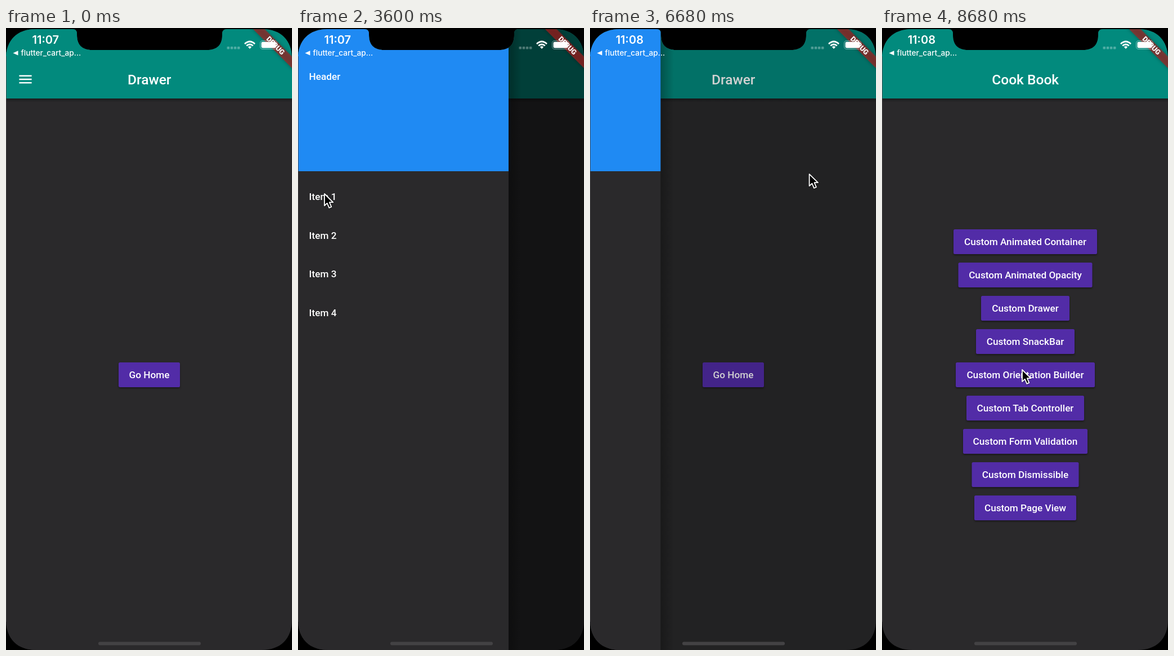
Animation, 508 px wide and 1103 px high, one loop 8.72 s. Source, as an HTML page:

```html
<!DOCTYPE html>
<html lang="en">
<head>
<meta charset="utf-8">
<title>Drawer</title>
<style>
  html, body { margin: 0; width: 100%; height: 100%; overflow: hidden; background: #000; }
  svg { display: block; width: 508px; height: 1103px; }
  text { fill: #fff; font-family: Roboto, "Noto Sans", sans-serif; font-weight: 500; font-size: 17.2px; }
  .mid { text-anchor: middle; }
  .title { font-size: 24.5px; text-anchor: middle; }
  .status { font-family: Inter, "Liberation Sans", sans-serif; }
  .body { fill: #2a292b; }
  .bar { fill: #028a7d; }
  .button { fill: #522ca7; filter: drop-shadow(0 2px 1.5px rgba(0, 0, 0, .4)); }
</style>
</head>
<body>
<svg viewBox="0 0 508 1103">
  <defs>
    <clipPath id="screen">
      <path d="M0 54C0 22 20 2 52 2H118Q126 2 126 10V12C126 30 135 39 153 39H357C375 39 384 30 384 12V10Q384 2 392 2H456C488 2 508 22 508 54V1049C508 1083 488 1103 454 1103H54C20 1103 0 1083 0 1049Z"/>
    </clipPath>
    <clipPath id="barClip"><rect width="508" height="125"/></clipPath>
    <linearGradient id="below" x2="0" y2="1">
      <stop stop-color="#000" stop-opacity=".32"/>
      <stop offset="1" stop-color="#000" stop-opacity="0"/>
    </linearGradient>
    <linearGradient id="beside">
      <stop stop-color="#000" stop-opacity=".28"/>
      <stop offset="1" stop-color="#000" stop-opacity="0"/>
    </linearGradient>
  </defs>

  <rect width="508" height="1103"/>
  <g clip-path="url(#screen)">
    <g id="home"></g>
    <g id="page"></g>
    <rect id="scrim" width="508" height="1103"/>
    <g id="drawer">
      <rect x="373.5" width="24" height="1103" fill="url(#beside)"/>
      <rect class="body" width="374" height="1103"/>
      <rect width="374" height="254" fill="#1f8af3"/>
      <text x="19.6" y="92.2">Header</text>
    </g>
    <g transform="translate(508 2) rotate(45)">
      <rect x="-60" y="34.3" width="120" height="14.7" fill="#b71c1c" fill-opacity=".63"
            style="filter:drop-shadow(0 0 3px rgba(0,0,0,.5))"/>
      <text class="mid" y="45.6" style="font-size:12.5px;font-weight:900">DEBUG</text>
    </g>
    <rect y="50" width="1" height="1003" fill="#48484a" fill-opacity=".8"/>
    <rect x="164" y="1088.5" width="182" height="6" rx="3" fill="#434244"/>
  </g>

  <text id="clock" class="status mid" x="70.3" y="28.2" style="font-size:20px;font-weight:600"></text>
  <path d="M12.5 44.4L21.5 40.2V48.6Z" fill="#fff"/>
  <text class="status" x="26.5" y="49" style="font-size:13.7px">flutter_cart_ap...</text>
  <g fill="#fff" fill-opacity=".3">
    <rect x="392.5" y="33" width="4.6" height="4.6" rx="1"/>
    <rect x="398.7" y="33" width="4.6" height="4.6" rx="1"/>
    <rect x="404.8" y="33" width="4.6" height="4.6" rx="1"/>
    <rect x="410.9" y="33" width="4.6" height="4.6" rx="1"/>
  </g>
  <g fill="none" stroke="#fff" stroke-width="2.7">
    <path d="M424 28.2Q433 19.8 442 28.2"/>
    <path d="M427.2 31.6Q433 26.4 438.800 31.6"/>
    <path d="M429.800 33.6Q433 31 436.2 33.600L433 37Z" fill="#fff" stroke="none"/>
  </g>
  <rect x="451.5" y="22.500" width="30" height="15" rx="4.2" fill="none" stroke="#fff" stroke-opacity=".45"/>
  <rect x="453.500" y="24.500" width="26" height="11" rx="2.4" fill="#fff"/>
  <path id="cursor" d="M0 0V21L4.800 16.600L8.300 24.800L12.300 23.100L8.900 15.100H15.300Z"
        stroke="#fff" stroke-width="1.800" stroke-linejoin="round"
        style="filter:drop-shadow(0 1px 1px rgba(0,0,0,.4))"/>
</svg>
<script>
const LOOP = 8720, STEP = 40, W = 508, DRAWER = 374;
const $ = id => document.getElementById(id);

const button = (label, width, y) =>
  `<rect class="button" x="${254.5 - width / 2}" y="${y}" width="${width}" height="44" rx="2.5"/>
   <text class="mid" x="254.5" y="${y + 28}">${label}</text>`;

const scaffold = (title, content) =>
  `<rect class="body" width="508" height="1103"/>
   <rect y="125" width="508" height="7" fill="url(#below)"/>
   <rect class="bar" width="508" height="125"/>
   <text class="title" x="254.7" y="99.6">${title}</text>${content}`;

const menu = [83.6, 89.8, 95.9].map(y =>
  `<rect x="23.4" y="${y}" width="22.2" height="2.45" fill="#fff"/>`).join('');

$('page').innerHTML = scaffold('Drawer',
  `<circle id="splash" cx="34.5" cy="91" fill="#fff" clip-path="url(#barClip)"/>${menu}` +
  button('Go Home', 109, 593));

const recipes = [
  ['Animated Container', 255], ['Animated Opacity', 238], ['Drawer', 157],
  ['SnackBar', 175], ['Orientation Builder', 247], ['Tab Controller', 209],
  ['Form Validation', 221], ['Dismissible', 190], ['Page View', 181]
];
$('home').innerHTML = scaffold('Cook Book',
  recipes.map(([name, w], i) => button('Custom ' + name, w, 357 + 59 * i)).join(''));

$('drawer').insertAdjacentHTML('beforeend', [1, 2, 3, 4].map(n =>
  `<text x="19.6" y="${235.9 + 68.8 * n}">Item ${n}</text>`).join(''));

// [time, x, y] of the pointer tip
const path = [
  [0, -30, 112], [160, -30, 112], [760, 226, 104], [1000, 228, 101], [1180, 272, 101],
  [1320, 240, 100], [1680, 39, 87], [2560, 39, 87], [2920, 46, 290], [3240, 50, 482],
  [3560, 47, 294], [3680, 47, 294], [3960, 49, 432], [4260, 46, 300], [4440, 46, 320],
  [4760, 49, 508], [5220, 42, 91], [5400, 42, 91], [5760, 210, 415], [6120, 396, 300],
  [6400, 403, 226], [6600, 403, 226], [7040, 249, 606], [LOOP, 249, 606]
];

const clamp = v => Math.max(0, Math.min(1, v));
const smooth = v => v * v * (3 - 2 * v);

function pointer(t) {
  const i = path.findIndex(p => p[0] > t);
  const [t0, x0, y0] = path[i - 1], [t1, x1, y1] = path[i];
  const k = smooth((t - t0) / (t1 - t0));
  return [x0 + (x1 - x0) * k, y0 + (y1 - y0) * k];
}

// Critically damped spring, 0 to 1
function spring(ms) {
  if (ms <= 0) return 0;
  const s = ms / 1000, w = Math.sqrt(500);
  return ms > 450 ? 1 : clamp(1 - Math.exp(-w * s) * (1 + (w - 1) * s));
}

function bezier(x, x1, y1, x2, y2) {
  if (x <= 0 || x >= 1) return clamp(x);
  const at = (u, a, b) => 3 * u * (1 - u) ** 2 * a + 3 * u * u * (1 - u) * b + u ** 3;
  let lo = 0, hi = 1;
  for (let i = 0; i < 24; i++) {
    const mid = (lo + hi) / 2;
    if (at(mid, x1, x2) < x) lo = mid; else hi = mid;
  }
  return at(lo, y1, y2);
}

const move = (id, x, y = 0) => $(id).setAttribute('transform', `translate(${x.toFixed(2)} ${y.toFixed(2)})`);

function draw(t) {
  const open = spring(t - 2008) - spring(t - 6580);
  move('drawer', DRAWER * (open - 1) - (open < .001 ? 30 : 0));
  $('scrim').setAttribute('fill-opacity', (.54 * open).toFixed(3));

  const pop = bezier((t - 7500) / 400, .35, .91, .33, .97);
  move('page', W * pop);
  move('home', -W / 3 * (1 - pop));

  const press = clamp((t - 1720) / 280);
  $('splash').setAttribute('r', press ? 12 + 31 * press : 0);
  $('splash').setAttribute('fill-opacity', .12 * (1 - clamp((t - 2000) / 200)));

  $('clock').textContent = t < 4440 ? '11:07' : '11:08';
  move('cursor', ...pointer(t));
}

const start = performance.now();
function tick() {
  const t = (performance.now() - start) % LOOP;
  draw(Math.floor(t / STEP) * STEP);
  requestAnimationFrame(tick);
}
tick();
</script>
</body>
</html>
```
